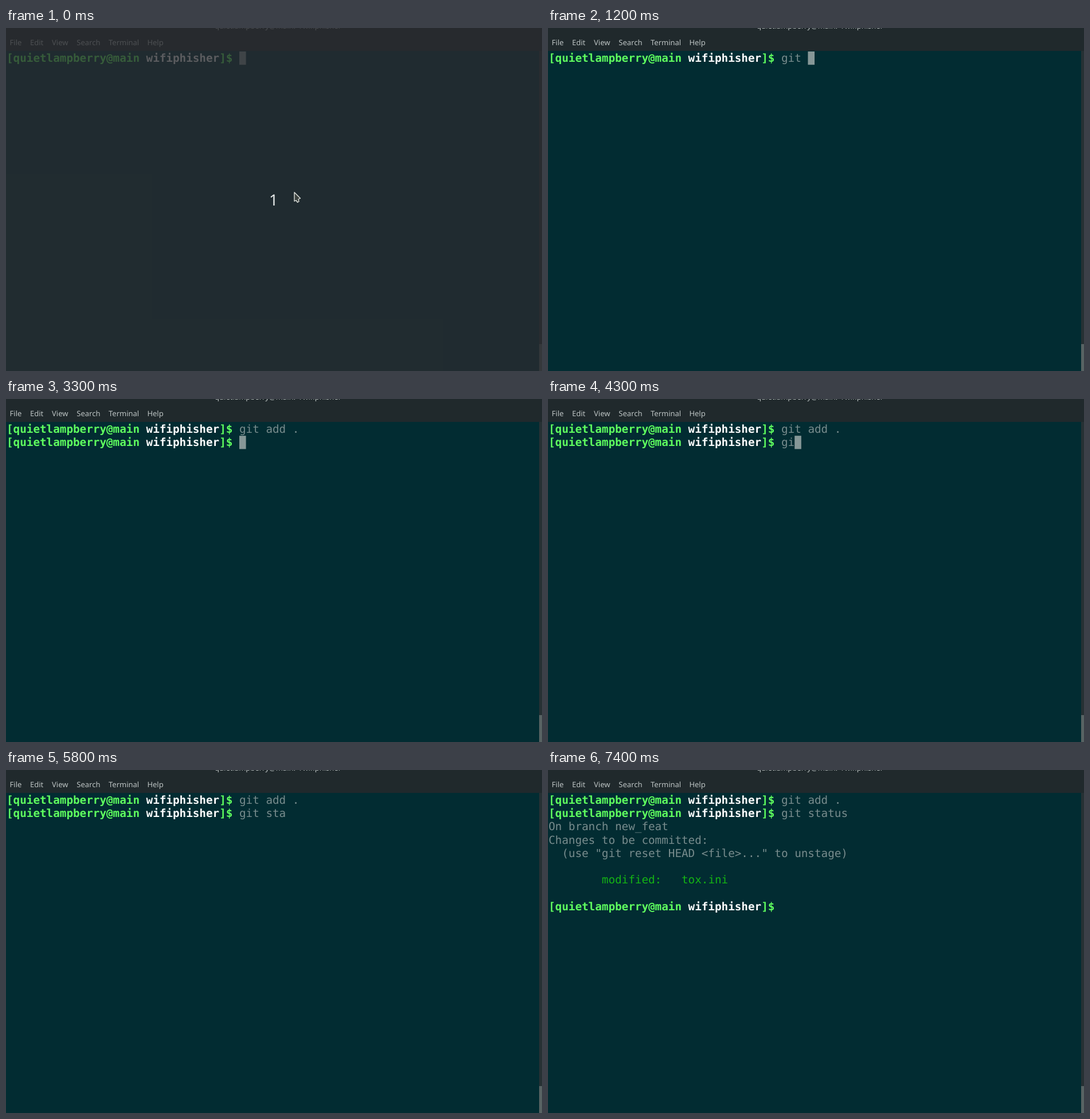
Animation of 935 by 599 pixels, one loop 8000 ms. Source, as an HTML page:

```html
<!DOCTYPE html>
<html lang="en">
<head>
<meta charset="utf-8">
<title>Terminal</title>
<style>
  html, body { margin: 0; width: 100%; height: 100%; overflow: hidden; background: #022c32; }
  svg { display: block; width: 935px; height: 599px; }
  text { white-space: pre; text-rendering: geometricPrecision; }
  .ui { font: 13px "Noto Sans", "Open Sans", sans-serif; fill: #bcc3c3; }
  .term { font: 19.27px "DejaVu Sans Mono", monospace; fill: #788c8d; }
  .prompt { font-weight: bold; fill: #5fff5f; }
  .dir { fill: #fff; }
  .staged { fill: #14b414; }
  .count { font: 27px "Noto Sans", "Open Sans", sans-serif; fill: #e6e9e9; }
</style>
</head>
<body>
<svg viewBox="0 0 935 599">
  <rect width="935" height="599" fill="#022c32"/>
  <rect width="935" height="40" fill="#20292c"/>
  <rect x="930" y="40" width="5" height="559" fill="#263134"/>
  <rect x="930" y="552" width="5" height="47" fill="#586363"/>

  <g class="ui">
    <text x="459" y="0.5" text-anchor="end">quietlampberry</text>
    <text x="459" y="0.5">@main:~/wifiphisher</text>
    <text x="6.6" y="29.5">File</text>
    <text x="42" y="29.5">Edit</text>
    <text x="80" y="29.5">View</text>
    <text x="123.3" y="29.5">Search</text>
    <text x="179" y="29.5">Terminal</text>
    <text x="246.4" y="29.5">Help</text>
  </g>

  <g id="screen" class="term"></g>
  <rect id="caret" width="11.6" height="23.2" fill="#869797"/>

  <g id="ibeam" fill="none">
    <path d="M501 280h6M501 294h6M504 280v14" stroke="#f2f4f4" stroke-width="3"/>
    <path d="M501.5 280h5M501.5 294h5M504 280v14" stroke="#101718" stroke-width="1"/>
  </g>

  <g id="intro">
    <rect width="935" height="599" fill="#2a2c2f" fill-opacity=".77"/>
    <text class="count" x="459" y="310">1</text>
    <path d="M503 287V302.5L506 301L508.500 304.500L511 303L510 299L513.500 297.500Z"
          fill="#3d4340" stroke="#e4e7e2" stroke-width="1.3" stroke-linejoin="round"/>
  </g>
</svg>

<script>
const LOOP = 8000, CELL_W = 11.6, CELL_H = 23.2, LEFT = 1, TOP = 41, BASE = 59;
const PROMPT_COLS = 35;
const $ = id => document.getElementById(id);

function addText(row, col = 0, cls = "", content = "") {
  const el = document.createElementNS("http://www.w3.org/2000/svg", "text");
  el.setAttribute("x", LEFT + col * CELL_W);
  el.setAttribute("y", BASE + row * CELL_H);
  el.setAttribute("class", cls);
  el.innerHTML = content;
  $("screen").append(el);
  return el;
}

const addPrompt = row => addText(row, 0, "prompt",
  '[quietlampberry@main <tspan class="dir">wifiphisher</tspan>]$');

const output = [
  addText(2, 0, "", "On branch new_feat"),
  addText(3, 0, "", "Changes to be committed:"),
  addText(4, 0, "", '  (use "git reset HEAD &lt;file&gt;..." to unstage)'),
  addText(6, 8, "staged", "modified:   tox.ini")
];

// Prompt rows; each is typed into in turn.
const lines = [
  { row: 0, command: "git add ." },
  { row: 1, command: "git status" },
  { row: 8, command: "" }
];
for (const line of lines) {
  line.prompt = addPrompt(line.row);
  line.input = addText(line.row, PROMPT_COLS);
}

// [start ms, active line, characters typed, caret visible]
const steps = [
  [0, 0, 0, 1], [200, 0, 0, 0], [600, 0, 0, 1], [800, 0, 2, 1],
  [1100, 0, 3, 1], [1200, 0, 4, 1], [1400, 0, 5, 1], [1900, 0, 6, 1],
  [2200, 0, 7, 1], [2500, 0, 8, 1], [2700, 0, 9, 1],
  [3300, 1, 0, 1], [3800, 1, 0, 0], [4100, 1, 1, 1], [4300, 1, 2, 1],
  [4600, 1, 3, 1], [4800, 1, 4, 1], [5000, 1, 5, 1], [5200, 1, 6, 1],
  [5300, 1, 7, 1], [5800, 1, 7, 0], [6000, 1, 8, 1], [6200, 1, 9, 1],
  [6700, 1, 10, 1], [6800, 2, 0, 1], [7400, 2, 0, 0]
];

const show = (el, on) => el.setAttribute("visibility", on ? "visible" : "hidden");
let shown;

function render(t) {
  const step = steps.findLast(s => s[0] <= t);
  if (step === shown) return;
  shown = step;
  const [start, active, typed, caretOn] = step;

  lines.forEach((line, i) => {
    show(line.prompt, i <= active);
    const count = i < active ? line.command.length : i === active ? typed : 0;
    line.input.textContent = line.command.slice(0, count);
  });
  output.forEach(el => show(el, active === 2));

  $("caret").setAttribute("x", LEFT + (PROMPT_COLS + typed) * CELL_W);
  $("caret").setAttribute("y", TOP + lines[active].row * CELL_H);
  show($("caret"), caretOn);
  show($("intro"), start === 0);
  show($("ibeam"), start === 200);
}

function tick() {
  render(performance.now() % LOOP);
  requestAnimationFrame(tick);
}
tick();
</script>
</body>
</html>
```
